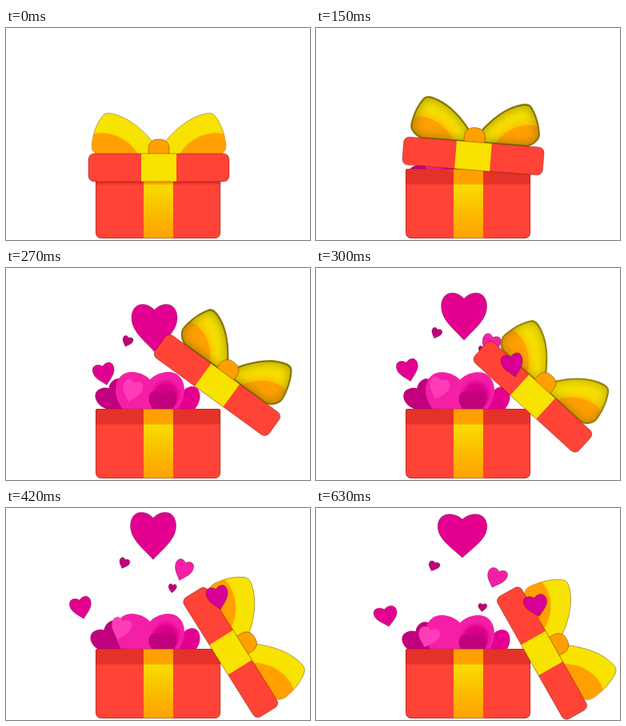
Animation, 380 px wide and 265 px high, one loop 660 ms. Source, as an HTML page with a canvas:

```html
<!DOCTYPE html>
<html>
<head>
<meta charset="utf-8">
<title>Gift box</title>
<style>
html, body { margin: 0; width: 100%; height: 100%; overflow: hidden; background: #fff; }
canvas { display: block; }
</style>
</head>
<body>
<canvas id="stage" width="380" height="265"></canvas>
<script>
const ctx = document.getElementById('stage').getContext('2d');
const LOOP = 660, STEP = 30;
const RED = '#ff4336', DARK_RED = '#e53228', YELLOW = '#f7e200', ORANGE = '#ffa000';
const MAGENTA = '#e30090', PLUM = '#c0007c', PINK = '#f51fa6', LIGHT = '#ff3db8';
const EDGE = 'rgba(50, 0, 0, .45)';

const LID_TIMES = [0, 150, 210, 270, 360, 510, 630];
const LID = {
  x: [191, 196.5, 237.5, 264, 279, 282, 282.5],
  y: [174.5, 160, 115, 146.5, 180, 181, 181.5],
  angle: [0, 4.5, 30, 36, 55, 60, 60.5],
  stretch: [0, .03, .08, .08, 0, 0, .045],
  shade: [0, 1, 1, 1, 0, 0, 0]
};

const TIMES = [150, 210, 270, 360, 510, 630];
const PILE_Y = [18, 4, -4, -3, 0, 0];
const PILE_LEFT = [8, 5, 4, -3, 0, 0];
const FLYERS = [
  { x: [187, 187, 185.5, 184.5, 183.5, 183], y: [192, 115, 75, 41.5, 30.5, 35], w: 57, h: 59, turn: 0, color: MAGENTA },
  { x: [160, 153, 151.5, 148, 147, 147], y: [190, 126, 92, 70, 69, 73], w: 13, h: 13, turn: 22, color: PLUM },
  { x: [205, 213, 217, 219, 224, 225], y: [190, 134, 110, 77, 82, 88], w: 23, h: 26, turn: 20, color: PINK },
  { x: [208, 208, 208, 208, 208, 208], y: [190, 131, 110, 95, 115, 124.5], w: 10, h: 11, turn: 6, color: PLUM },
  { x: [145, 139, 123, 102, 88, 88], y: [192, 157, 133, 123.5, 130.5, 136], w: 27, h: 27, turn: -13, color: MAGENTA }
];
const FRONT = { x: [222, 228, 241, 255, 275, 275.5], y: [192, 156, 131, 111, 117, 122.5], w: 27, h: 29, turn: -13, color: '#d80094' };
const GLOSSY = { x: [167, 165, 157, 147, 140, 140], y: [198, 176, 154, 148.5, 158, 162], w: 25, h: 27, turn: 17, color: LIGHT };

// Monotone cubic interpolation: smooth, without overshoot.
function track(times, values, t) {
  const last = times.length - 1;
  if (t <= times[0]) return values[0];
  if (t >= times[last]) return values[last];
  const slope = i => (values[i + 1] - values[i]) / (times[i + 1] - times[i]);
  const tangent = i => {
    if (i === 0 || i === last) return 0;
    const a = slope(i - 1), b = slope(i);
    return a * b <= 0 ? 0 : 2 * a * b / (a + b);
  };
  let i = 0;
  while (t > times[i + 1]) i++;
  const d = times[i + 1] - times[i], u = (t - times[i]) / d, v = 1 - u;
  return values[i] * (1 + 2 * u) * v * v + values[i + 1] * u * u * (3 - 2 * u)
    + d * u * v * (tangent(i) * v - tangent(i + 1) * u);
}

function scoped(draw) {
  ctx.save();
  draw();
  ctx.restore();
}

function rect(x, y, w, h, color) {
  ctx.fillStyle = color;
  ctx.fillRect(x, y, w, h);
}

function roundRectPath(x, y, w, h, radius) {
  ctx.beginPath();
  ctx.roundRect(x, y, w, h, radius);
}

function fill(color) {
  ctx.fillStyle = color;
  ctx.fill();
}

function outline() {
  ctx.strokeStyle = EDGE;
  ctx.lineWidth = .7;
  ctx.stroke();
}

function heartPath() {
  ctx.beginPath();
  ctx.moveTo(0, -.38);
  ctx.bezierCurveTo(-.08, -.47, -.18, -.5, -.27, -.5);
  ctx.bezierCurveTo(-.41, -.5, -.5, -.38, -.5, -.22);
  ctx.bezierCurveTo(-.5, .08, -.2, .28, 0, .5);
  ctx.bezierCurveTo(.2, .28, .5, .08, .5, -.22);
  ctx.bezierCurveTo(.5, -.38, .41, -.5, .27, -.5);
  ctx.bezierCurveTo(.18, -.5, .08, -.47, 0, -.38);
  ctx.closePath();
}

function heart(x, y, w, h, turn, color, squash = 0) {
  scoped(() => {
    ctx.translate(x, y);
    ctx.scale(1 + squash, 1 - squash);
    ctx.rotate(turn * Math.PI / 180);
    ctx.scale(w, h);
    heartPath();
  });
  fill(color);
}

function flyer(f, t) {
  heart(track(TIMES, f.x, t), track(TIMES, f.y, t), f.w, f.h, f.turn, f.color,
    track([510, 630], [0, .08], t));
}

function outlinedFlyer(f, t) {
  flyer(f, t);
  outline();
}

function pile(t) {
  const dy = track(TIMES, PILE_Y, t);
  heart(133 + track(TIMES, PILE_LEFT, t), 168 + dy, 43, 43, -32, PLUM);
  heart(222, 174 + dy, 41, 44, 0, MAGENTA);
  heart(180, 174 + dy, 86, 80, 0, PINK);
  const glow = ctx.createRadialGradient(200, 162 + dy, 6, 200, 162 + dy, 22);
  glow.addColorStop(0, '#d00086');
  glow.addColorStop(.5, MAGENTA);
  glow.addColorStop(1, '#f51fa600');
  ctx.beginPath();
  ctx.arc(200, 162 + dy, 22, 0, 7);
  fill(glow);
  heart(196, 175 + dy, 35, 34, 0, PLUM);
  flyer(GLOSSY, t);
}

function box() {
  const corners = [2, 2, 7, 7];
  roundRectPath(112, 176, 156, 87, corners);
  fill(RED);
  rect(112, 177, 156, 18.5, DARK_RED);
  const ribbon = ctx.createLinearGradient(0, 195, 0, 263);
  ribbon.addColorStop(0, '#f8dc00');
  ribbon.addColorStop(1, ORANGE);
  rect(172, 195, 37, 68, ribbon);
  rect(172, 176, 37, 19.5, ORANGE);
  roundRectPath(112.4, 176.4, 155.4, 86.4, corners);
  outline();
}

function loopPath(shade) {
  const corner = -76 + 9 * shade;
  ctx.beginPath();
  ctx.moveTo(-4, -17);
  ctx.lineTo(corner, -17);
  ctx.bezierCurveTo(corner - 8, -18, -85, -26, -83, -34);
  ctx.bezierCurveTo(-81, -48, -75, -59, -70, -65);
  ctx.bezierCurveTo(-66, -70, -58, -68, -50, -65);
  ctx.bezierCurveTo(-36, -60, -20, -48, -6, -30);
  ctx.closePath();
}

function bowLoop(side, stretch, shade) {
  scoped(() => {
    ctx.translate(0, -17.5);
    ctx.scale(side * (1 - stretch), 1 + 1.3 * stretch);
    ctx.translate(0, 17.5);
    loopPath(shade);
    fill(YELLOW);
    outline();
    ctx.clip();

    ctx.beginPath();
    ctx.moveTo(-90, -38);
    ctx.bezierCurveTo(-72, -50, -38, -40, -25, -14);
    ctx.lineTo(-90, -10);
    ctx.closePath();
    ctx.shadowColor = ORANGE;
    ctx.shadowBlur = 2 + 14 * shade;
    fill(ORANGE);

    if (shade > 0) {
      loopPath(shade);
      ctx.globalAlpha = shade;
      ctx.shadowColor = '#665c00';
      ctx.shadowBlur = 12;
      ctx.strokeStyle = '#867800';
      ctx.lineWidth = 4;
      ctx.stroke();
    }
  });
}

function lid(t) {
  const at = name => track(LID_TIMES, LID[name], t);
  scoped(() => {
    ctx.translate(at('x'), at('y'));
    ctx.rotate(at('angle') * Math.PI / 180);
    bowLoop(1, at('stretch'), at('shade'));
    bowLoop(-1, at('stretch'), at('shade'));
    roundRectPath(-13, -35.5, 26, 24, [11, 11, 0, 0]);
    fill(ORANGE);
    outline();
    roundRectPath(-88, -17.5, 176, 35, 7);
    fill(RED);
    rect(-22, -17.5, 44, 35, YELLOW);
    outline();
  });
}

function draw(t) {
  rect(0, 0, 380, 265, '#fff');
  const inFront = t >= 300;
  scoped(() => {
    ctx.beginPath();
    ctx.rect(0, 0, 380, 177);
    ctx.clip();
    pile(t);
    FLYERS.forEach(f => outlinedFlyer(f, t));
    if (!inFront) flyer(FRONT, t);
  });
  box();
  lid(t);
  if (inFront) outlinedFlyer(FRONT, t);
}

const start = performance.now();
function tick() {
  const elapsed = (performance.now() - start) % LOOP;
  draw(Math.floor(elapsed / STEP) * STEP);
  requestAnimationFrame(tick);
}
tick();
</script>
</body>
</html>
```
